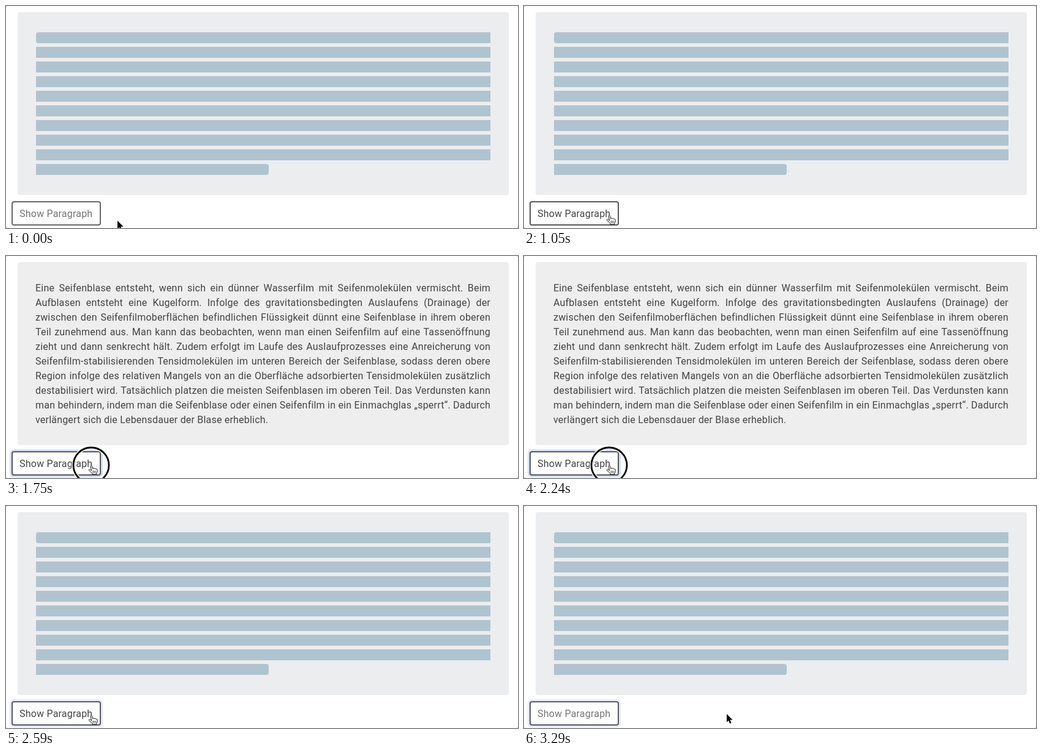
These frames come from a looping animation (836 px wide and 364 px high, 3360 ms). An HTML page:

```html
<!DOCTYPE html>
<html lang="de">
<head>
<meta charset="utf-8">
<title>Show Paragraph</title>
<style>
  html, body { margin: 0; width: 100%; height: 100%; overflow: hidden; background: #8a8a8a; }
  #stage {
    position: relative; width: 836px; height: 364px; overflow: hidden;
    border-radius: 2px; background: #fff;
    font: 16px/24px Roboto, Inter, sans-serif; letter-spacing: .2px;
  }
  #stage > * { position: absolute; box-sizing: border-box; }
  #panel { left: 19px; top: 10px; width: 802px; height: 300px; border-radius: 4px; }
  #text { left: 48px; top: 41px; width: 743px; color: #444; }
  #text div { height: 24px; text-align: justify; text-align-last: justify; }
  #text div:last-child { text-align-last: left; }
  #bars { left: 49px; top: 43px; width: 742px; }
  #bars div { height: 18px; margin-bottom: 6px; background: #b0c4cf; }
  #bars div:first-child { border-radius: 4px 0 0 4px; }
  #bars div:last-child { width: 380px; border-radius: 0 4px 4px 0; }
  #button {
    left: 9px; top: 320px; width: 146px; height: 40px; padding: 1px 0 0 11px;
    border: 2px solid; border-radius: 4px; background: #fff; line-height: 36px; white-space: nowrap;
  }
  #overlay { left: 0; top: 0; }
</style>
</head>
<body>
<div id="stage">
  <div id="panel"></div>
  <div id="bars"></div>
  <div id="text"></div>
  <div id="button"><span id="label">Show Paragraph</span></div>
  <svg id="overlay" width="836" height="364" fill="none">
    <g id="click">
      <circle cx="139" cy="343" r="29" stroke="#fff" stroke-opacity=".85" stroke-width="6"/>
      <circle cx="139" cy="343" r="29" stroke="#000" stroke-width="2.8"/>
    </g>
    <path id="arrow" d="M0 0V13.5L3 10.7L5.2 15.8L7.6 14.8L5.4 9.8H9.6Z"
      fill="#000" stroke="#fff" stroke-width="1.6" paint-order="stroke" stroke-linejoin="round"/>
    <g id="hand" stroke="#111" stroke-linejoin="round" stroke-linecap="round">
      <path fill="#fff" d="M-.8 1.8C-1 .2 1.3 0 1.7 1.6L2.6 5.6C3.1 4.4 5 4.5 5.3 5.9C5.9 5 7.5 5.2 7.8 6.5C8.7 5.8 10.1 6.4 10.1 7.8C10.3 10 9.7 12 8.7 13.2V15H1.9V13.6C.2 12.2 -1.3 10.2 -3.3 8.6C-4.5 7.4 -3.1 6.2 -1.7 7L.3 8.6Z"/>
      <path stroke-width=".8" d="M3.1 9.6V12.4M5.1 9.6V12.4M7.1 9.6V12.4"/>
    </g>
  </svg>
</div>
<script>
const LOOP = 3360, STEP = 70;
const ARRIVE = 840, SHOW = 1120, HIDE = 2590, LEAVE = 3010, END = 3290;

const lines = [
  "Eine Seifenblase entsteht, wenn sich ein dünner Wasserfilm mit Seifenmolekülen vermischt. Beim",
  "Aufblasen entsteht eine Kugelform. Infolge des gravitationsbedingten Auslaufens (Drainage) der",
  "zwischen den Seifenfilmoberflächen befindlichen Flüssigkeit dünnt eine Seifenblase in ihrem oberen",
  "Teil zunehmend aus. Man kann das beobachten, wenn man einen Seifenfilm auf eine Tassenöffnung",
  "zieht und dann senkrecht hält. Zudem erfolgt im Laufe des Auslaufprozesses eine Anreicherung von",
  "Seifenfilm-stabilisierenden Tensidmolekülen im unteren Bereich der Seifenblase, sodass deren obere",
  "Region infolge des relativen Mangels von an die Oberfläche adsorbierten Tensidmolekülen zusätzlich",
  "destabilisiert wird. Tatsächlich platzen die meisten Seifenblasen im oberen Teil. Das Verdunsten kann",
  "man behindern, indem man die Seifenblase oder einen Seifenfilm in ein Einmachglas „sperrt“. Dadurch",
  "verlängert sich die Lebensdauer der Blase erheblich."
];

const $ = id => document.getElementById(id);
const show = (id, on) => $(id).style.display = on ? "" : "none";
const mix = (a, b, k) => a + (b - a) * k;
const ramp = (t, from, to) => Math.min(1, Math.max(0, (t - from) / (to - from)));
const ease = k => k * k * (3 - 2 * k);
const gray = v => `rgb(${v}, ${v}, ${v})`;

for (const line of lines) {
  $("text").appendChild(document.createElement("div")).textContent = line;
  $("bars").appendChild(document.createElement("div"));
}

function draw(t) {
  const open = t >= SHOW && t < HIDE;
  const come = ease(ramp(t, ARRIVE - 385, ARRIVE));
  const go = ease(ramp(t, LEAVE, END));
  const x = mix(mix(182, 139, come), 331, go);
  const y = mix(mix(352, 343, come), 341, go);
  const over = x < 155;
  const hover = ramp(t, ARRIVE - 210, ARRIVE) - ramp(t, END - 210, END);
  const focus = ramp(t, SHOW, SHOW + 140);

  $("panel").style.background = open ? "#eee" : "#ecedef";
  show("text", open);
  show("bars", !open);
  show("click", open);
  show("hand", over);
  show("arrow", !over);
  $(over ? "hand" : "arrow").setAttribute("transform", `translate(${x} ${y})`);
  $("label").style.color = gray(mix(116, 68, hover));
  $("button").style.borderColor = t < HIDE ? gray(mix(104, 88, hover)) : "#58586a";
  $("button").style.boxShadow = `0 0 0 3px rgba(${open ? "212, 223, 245" : "230, 233, 240"}, ${focus})`;
}

const start = performance.now();
function tick() {
  const t = (performance.now() - start) % LOOP;
  draw(Math.floor(t / STEP) * STEP);
  requestAnimationFrame(tick);
}
tick();
</script>
</body>
</html>
```
